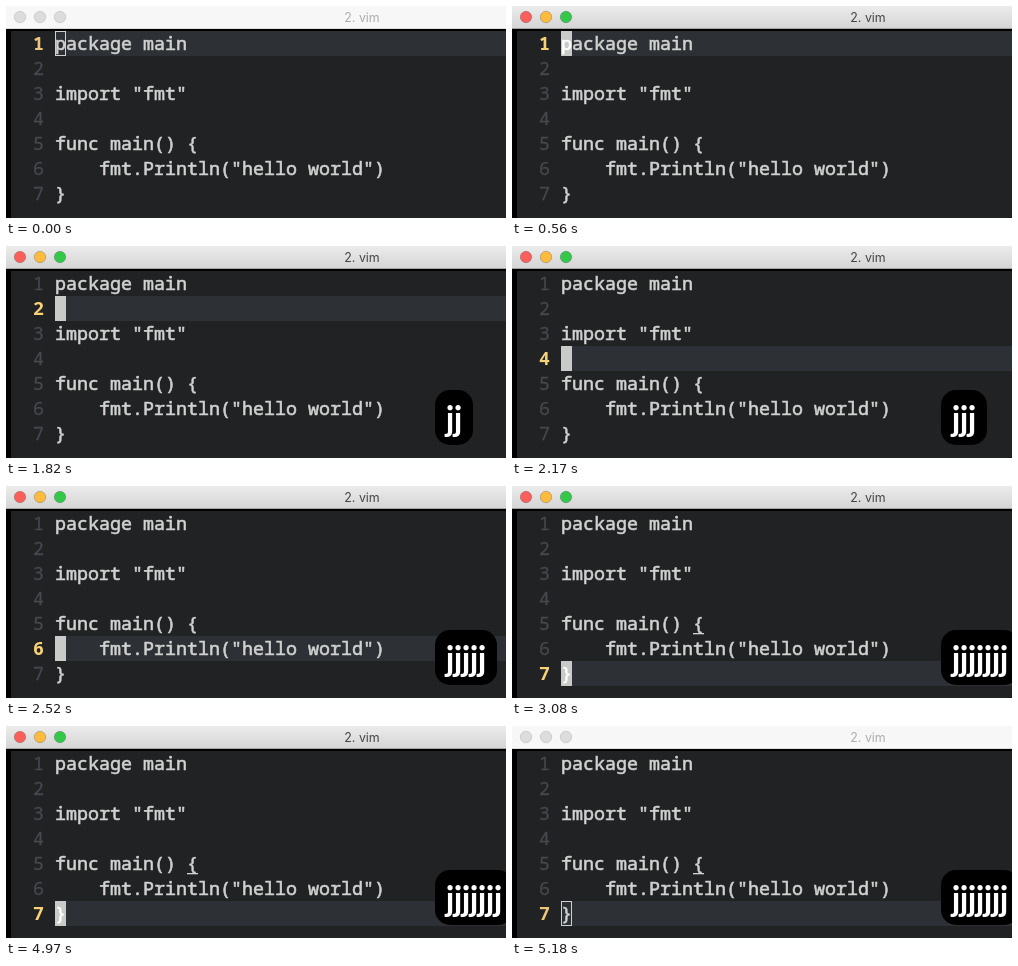
An HTML page for the animation above (5.25 s loop, 500 px wide and 212 px high).

```html
<!DOCTYPE html>
<html lang="en">
<head>
<meta charset="utf-8">
<title>vim</title>
<style>
  html, body { margin: 0; width: 100%; height: 100%; overflow: hidden; background: #000; }
  svg { display: block; width: 100%; height: 100%; }
  text { white-space: pre; }
  .code { font: 18.33px "Noto Sans Mono", "DejaVu Sans Mono", monospace; fill: #d0d2d0; }
  .code text { stroke: #d0d2d0; stroke-width: .6px; }
  .code .num { fill: #45484c; stroke: #45484c; stroke-width: .3px; }
  .code .num.current { fill: #f9d277; stroke: none; font-weight: 700; }
  .code .under { fill: #fff; stroke: #fff; }
  .title { font: 12.4px Inter, Roboto, sans-serif; fill: #444; text-anchor: middle; }
  .border { fill: #a3a3a3; }
  .light { stroke: #0003; }
  .keys { font: bold 34px Lato, "Liberation Sans", sans-serif; text-anchor: middle; fill: #fff; }
  .inactive .title { fill: #adadad; }
  .inactive .bar { fill: #f7f7f7; }
  .inactive .border { fill: #dadada; }
  .inactive .light { fill: #dcdcdc; stroke: #cfcfcf; }
  .inactive .num.current { fill: #ecc57c; }
</style>
</head>
<body>
<svg id="stage" viewBox="0 0 500 212" preserveAspectRatio="none">
  <defs>
    <linearGradient id="chrome" x2="0" y2="1">
      <stop stop-color="#ececec"/>
      <stop offset="1" stop-color="#d5d5d5"/>
    </linearGradient>
  </defs>
  <rect width="500" height="212"/>
  <rect class="bar" width="500" height="22" fill="url(#chrome)"/>
  <rect class="border" y="22" width="500" height="1"/>
  <g id="lights"></g>
  <text class="title" x="356" y="16">2. vim</text>
  <rect x="5" y="25" width="495" height="187" fill="#202224"/>
  <rect id="lineBg" x="49" width="451" height="25" fill="#2d3135"/>
  <g id="code" class="code"></g>
  <rect id="match" x="181" y="147" width="11" height="1.3" fill="#d0d2d0"/>
  <g id="block" class="code">
    <rect x="49" width="11" height="25" fill="#c9cbc9"/>
    <text id="under" class="under" x="49" y="19"></text>
  </g>
  <rect id="outline" x="49.5" width="10" height="24" fill="none" stroke="#d0d2d0"/>
  <g id="overlay">
    <rect id="pill" x="429" y="144" height="55" rx="15"/>
    <text id="keys" class="keys" y="185"></text>
  </g>
</svg>
<script>
const LOOP = 5250, LEFT = 49, TOP = 25, ROW = 25, COL = 11, BASELINE = 19;
const KEY_LEFT = 444, KEY_STEP = 8;
const source = ['package main', '', 'import "fmt"', '', 'func main() {',
  '    fmt.Println("hello world")', '}'];
const el = id => document.getElementById(id);
const rowTop = row => TOP + (row - 1) * ROW;

function add(parent, tag, attrs, content = '') {
  const node = document.createElementNS(parent.namespaceURI, tag);
  for (const name in attrs) node.setAttribute(name, attrs[name]);
  node.textContent = content;
  return parent.appendChild(node);
}

['#fc605b', '#fdbc40', '#34c84a'].forEach((fill, i) =>
  add(el('lights'), 'circle', { class: 'light', cx: 14 + 20 * i, cy: 11, r: 5.7, fill }));

const numbers = source.map((line, i) => {
  const y = rowTop(i + 1) + BASELINE;
  const indent = line.length - line.trimStart().length;
  add(el('code'), 'text', { x: LEFT + indent * COL, y }, line.trim());
  return add(el('code'), 'text', { class: 'num', x: LEFT - 2 * COL, y }, i + 1);
});

// Each step: time, cursor row, keys shown, cursor style
const steps = [
  [0, 1, 0, 'outline'],
  [560, 1, 0, 'block'],
  [1120, 1, 0, 'off'],
  [1470, 1, 1, 'off'],
  [1540, 2, 1, 'block'],
  [1820, 2, 2, 'block'],
  [1890, 3, 2, 'block'],
  [2030, 3, 3, 'block'],
  [2100, 4, 3, 'block'],
  [2240, 4, 4, 'block'],
  [2310, 5, 4, 'block'],
  [2450, 5, 5, 'block'],
  [2520, 6, 5, 'block'],
  [2660, 6, 6, 'block'],
  [2730, 7, 6, 'block'],
  [2870, 7, 7, 'block'],
  [4410, 7, 7, 'off'],
  [4970, 7, 7, 'block'],
  [5180, 7, 7, 'outline']
];

const show = (id, on) => el(id).setAttribute('visibility', on ? 'visible' : 'hidden');
let shown;

function render(time) {
  const step = steps.findLast(([start]) => start <= time);
  if (step === shown) return;
  shown = step;
  const [, row, count, cursor] = step;
  const y = rowTop(row);
  const keyCentres = Array.from({ length: count }, (_, i) => KEY_LEFT + KEY_STEP * i);

  el('stage').classList.toggle('inactive', cursor === 'outline');
  numbers.forEach((n, i) => n.classList.toggle('current', i + 1 === row));
  el('lineBg').setAttribute('y', y);
  el('block').setAttribute('transform', `translate(0 ${y})`);
  el('under').textContent = source[row - 1].charAt(0);
  el('outline').setAttribute('y', y + .5);
  show('block', cursor === 'block');
  show('outline', cursor === 'outline');
  show('match', row === 7);
  show('overlay', count > 0);
  el('pill').setAttribute('width', 22 + KEY_STEP * count);
  el('keys').setAttribute('x', keyCentres.join(' '));
  el('keys').textContent = 'j'.repeat(count);
}

function tick() {
  render(performance.now() % LOOP);
  requestAnimationFrame(tick);
}
tick();
</script>
</body>
</html>
```
